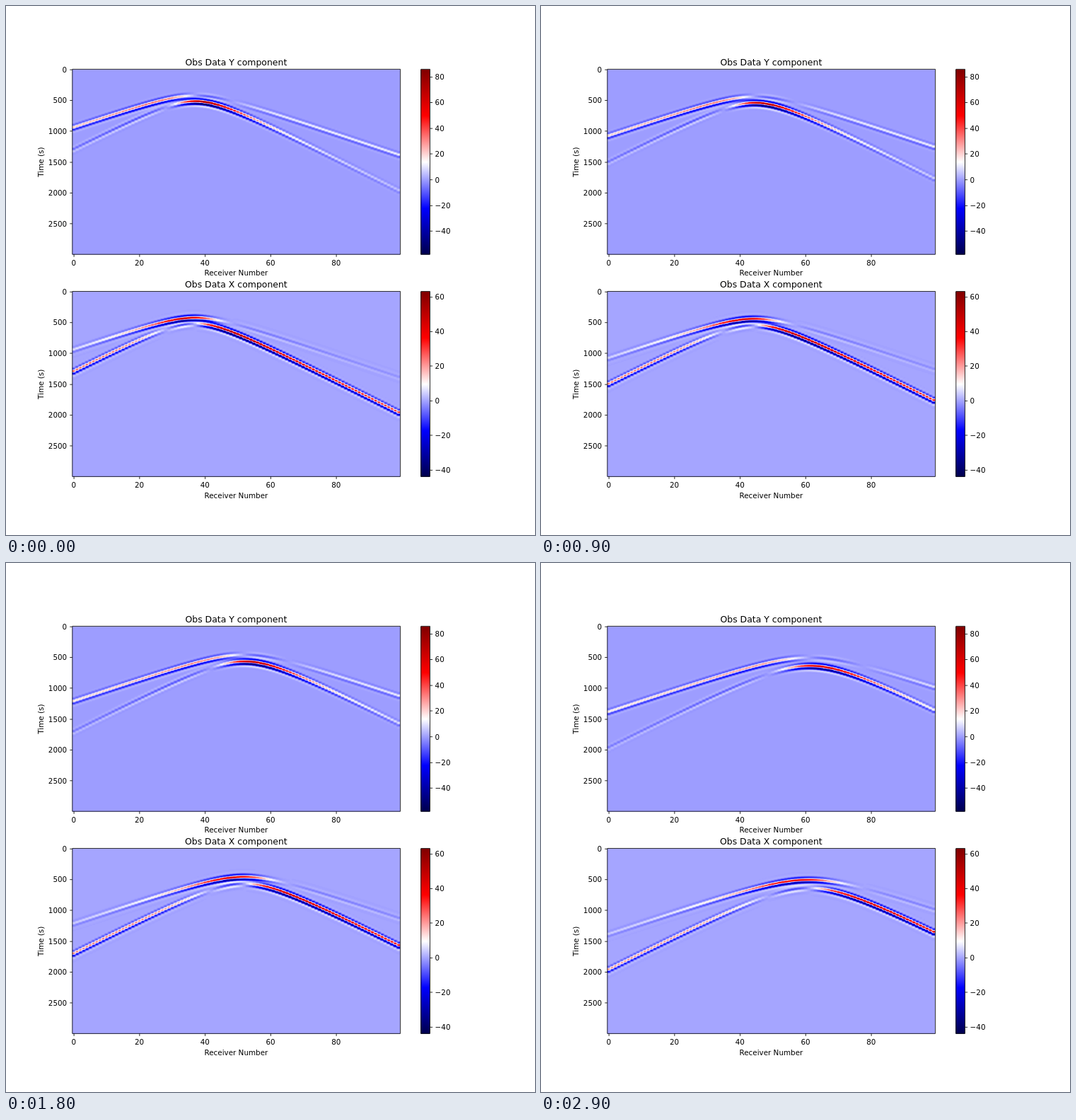
An HTML page with a canvas for the animation above (3 s loop, 748 by 748 pixels).

```html
<!DOCTYPE html>
<html lang="en">
<head>
<meta charset="utf-8">
<title>Observed data</title>
<style>
html, body { margin: 0; width: 100%; height: 100%; overflow: hidden; background: #fff; }
#stage { position: relative; width: 748px; height: 748px; overflow: hidden; }
canvas, svg { position: absolute; left: 0; top: 0; width: 748px; height: 748px; }
text { font-family: "DejaVu Sans", sans-serif; font-size: 13.89px; fill: #000; }
.title { font-size: 16.67px; }
.mid { text-anchor: middle; }
.end { text-anchor: end; }
.line { fill: none; stroke: #000; stroke-width: 1.11; }
</style>
</head>
<body>
<div id="stage">
  <canvas id="view" width="1000" height="1000"></canvas>
  <svg id="chart" viewBox="0 0 1000 1000">
    <defs>
      <linearGradient id="seismic" x1="0" y1="1" x2="0" y2="0">
        <stop offset="0" stop-color="#00004c"/>
        <stop offset=".25" stop-color="#0000ff"/>
        <stop offset=".5" stop-color="#ffffff"/>
        <stop offset=".75" stop-color="#ff0000"/>
        <stop offset="1" stop-color="#800000"/>
      </linearGradient>
    </defs>
  </svg>
</div>
<script>
// The figure is laid out on a 1000 x 1000 grid and scaled to the stage.
const STEP = 100, STEPS = 30;
const LEFT = 125, WIDTH = 620, HEIGHT = 350;
const RECEIVERS = 100, SAMPLES = 3000;
const panels = [
  { name: 'Y', top: 120, min: -58.2, max: 85.8, ticks: [-40, -20, 0, 20, 40, 60, 80] },
  { name: 'X', top: 540, min: -43.9, max: 63.1, ticks: [-40, -20, 0, 20, 40, 60] }
];

// Chart furniture
const chart = document.getElementById('chart');
const TICK = 4.86, PAD = 9.72;

function add(tag, attrs, content) {
  const el = document.createElementNS('http://www.w3.org/2000/svg', tag);
  for (const key in attrs) el.setAttribute(key, attrs[key]);
  if (content !== undefined) el.textContent = content;
  chart.appendChild(el);
}
const label = (x, y, str, cls) => add('text', { x, y, class: cls }, str);
const line = d => add('path', { d, class: 'line' });
const frame = (l, t, r, b) => line(`M${l} ${t}H${r}V${b}H${l}Z`);
const snap = v => Math.floor(v) + .5;

for (const p of panels) {
  const top = p.top - .5, bottom = top + HEIGHT, mid = LEFT + WIDTH / 2;
  frame(LEFT + .5, top, LEFT + WIDTH + .5, bottom);
  label(mid, p.top - 8.33, `Obs Data ${p.name} component`, 'title mid');
  label(mid, p.top + HEIGHT + 40, 'Receiver Number', 'mid');
  const cy = p.top + HEIGHT / 2;
  add('text', { class: 'mid', transform: `translate(70.9 ${cy}) rotate(-90)` }, 'Time (s)');

  for (let r = 0; r < RECEIVERS; r += 20) {
    const x = LEFT + (r + .5) * WIDTH / RECEIVERS;
    line(`M${snap(x)} ${bottom}v${TICK}`);
    label(x, p.top + HEIGHT + 20, r, 'mid');
  }
  for (let t = 0; t < SAMPLES; t += 500) {
    const y = p.top + (t + .5) * HEIGHT / SAMPLES;
    line(`M${LEFT + .5} ${snap(y)}h${-TICK}`);
    label(LEFT - PAD, y + 5.1, t, 'end');
  }

  add('rect', { x: 783.75, y: p.top, width: 17.5, height: HEIGHT, fill: 'url(#seismic)' });
  frame(784.5, top, 801.5, bottom);
  for (const v of p.ticks) {
    const y = p.top + (p.max - v) / (p.max - p.min) * HEIGHT;
    line(`M801.5 ${snap(y)}h${TICK}`);
    label(801.25 + PAD, y + 5.1, String(v).replace('-', '\u2212'), '');
  }
}

// Seismic colour map in 256 levels, u in 0..1
function paint(data, i, u) {
  const clamp = v => Math.max(0, Math.min(1, v));
  u = clamp(Math.floor(u * 256) / 255);
  data[i] = 255 * (u < .75 ? clamp(4 * u - 1) : 1 - 2 * (u - .75));
  data[i + 1] = 255 * clamp(u < .5 ? 4 * u - 1 : 3 - 4 * u);
  data[i + 2] = 255 * (u < .25 ? .3 + 2.8 * u : clamp(3 - 4 * u));
  data[i + 3] = 255;
}

// Skewed wavelet with its main peak at zero
function wavelet(t) {
  const s = Math.PI * t / 45;
  if (Math.abs(s) > 14) return 0;
  return Math.cos(s) * Math.exp((.826 ** 2 - (s - .826) ** 2) / 12.15);
}

// Source position along and away from the receiver line
function source(n) {
  let depth = 10 + .105 * n;
  if (n >= 20) depth = 9.9 + .15 * (n - 20);
  if (n >= 28) depth = 14.3 + .2 * (n - 28);
  return { x: 37 + .833 * n, depth };
}

const ctx = document.getElementById('view').getContext('2d');
const image = ctx.createImageData(WIDTH, HEIGHT);
const FORCE = -41 * Math.PI / 180;
const DELAY = 240;

// P and S arrivals of a point force at every receiver
function arrivals(n) {
  const src = source(n), list = [];
  for (let r = 0; r < RECEIVERS; r++) {
    const dx = r - src.x, dist = Math.hypot(dx, src.depth);
    const sin = dx / dist, cos = src.depth / dist;
    const angle = Math.atan2(dx, src.depth) - FORCE;
    const spread = Math.sqrt(10 / dist);
    const p = 62 * spread * Math.cos(angle), s = 105 * spread * Math.sin(angle);
    list.push({
      tp: DELAY + 18.1 * dist, ts: DELAY + 27.25 * dist,
      Y: [-p * sin, s * cos], X: [p * cos, s * sin]
    });
  }
  return list;
}

function drawPanel(p, list) {
  const traces = list.map(a => {
    const trace = new Float32Array(HEIGHT);
    for (let row = 0; row < HEIGHT; row++) {
      const t = (row + .5) / HEIGHT * SAMPLES;
      trace[row] = a[p.name][0] * wavelet(t - a.tp) + a[p.name][1] * wavelet(t - a.ts);
    }
    return trace;
  });
  for (let col = 0; col < WIDTH; col++) {
    const pos = (col + .5) / WIDTH * RECEIVERS - .5;
    const r = Math.max(0, Math.min(RECEIVERS - 1.001, pos));
    const k = Math.floor(r), mix = .5 - .5 * Math.cos(Math.PI * (r - k));
    const a = traces[k], b = traces[k + 1];
    for (let row = 0; row < HEIGHT; row++) {
      const v = a[row] + (b[row] - a[row]) * mix;
      paint(image.data, 4 * (row * WIDTH + col), (v - p.min) / (p.max - p.min));
    }
  }
  ctx.putImageData(image, LEFT, p.top);
}

let shown = -1;
const start = performance.now();
function tick() {
  const n = Math.floor(Math.max(0, performance.now() - start) / STEP) % STEPS;
  if (n !== shown) {
    const list = arrivals(n);
    for (const p of panels) drawPanel(p, list);
    shown = n;
  }
  requestAnimationFrame(tick);
}
tick();
</script>
</body>
</html>
```
